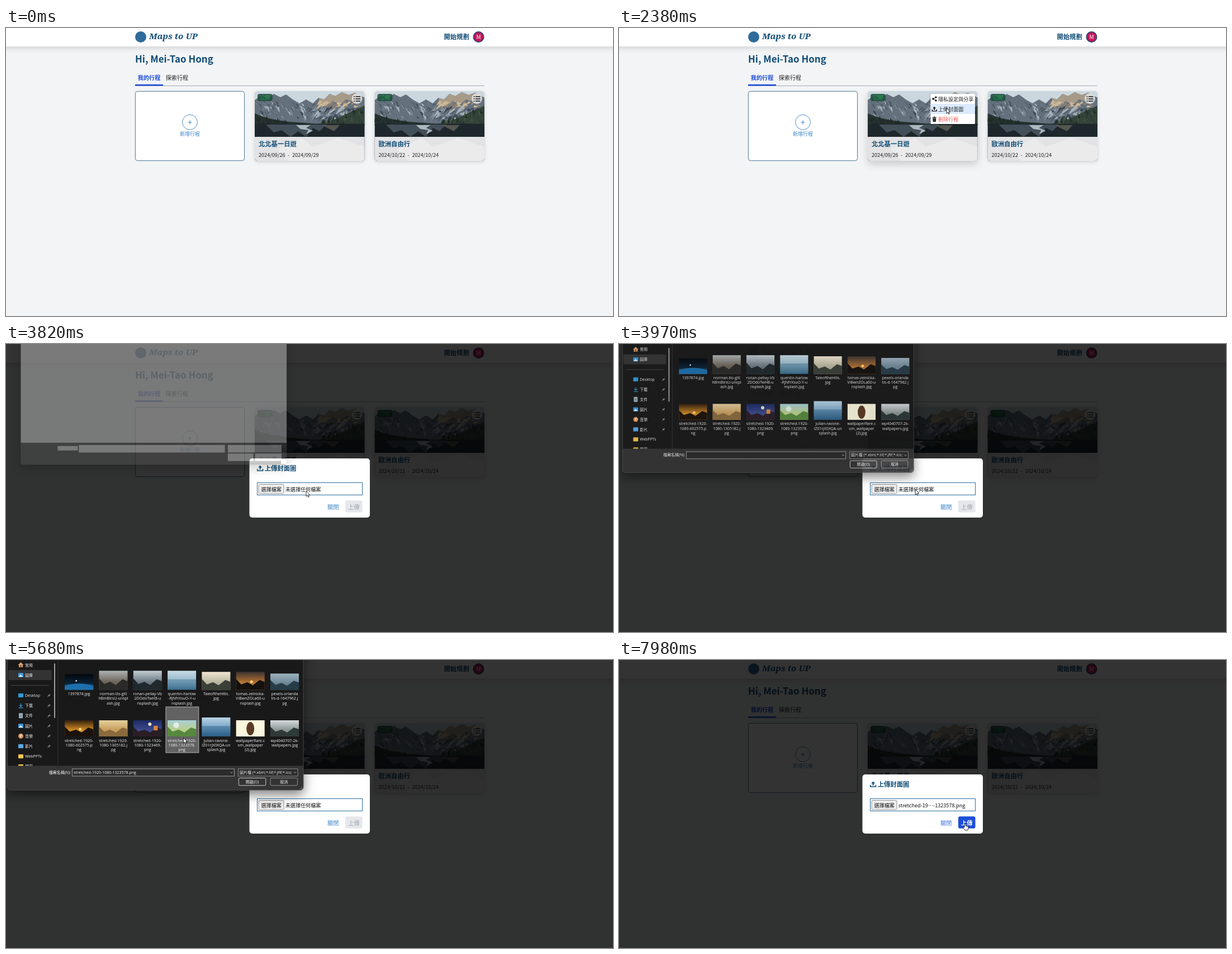
Animation of 1086x516 px, one loop 8 s. Source, as an HTML page:

```html
<!DOCTYPE html>
<html lang="zh-Hant">
<head>
<meta charset="utf-8">
<title>行程</title>
<style>
html,body{margin:0;width:100%;height:100%;overflow:hidden;background:#f3f4f6}
svg{display:block;width:1086px;height:516px}
text{font-family:"Noto Sans CJK TC","Noto Sans CJK JP","Noto Sans CJK",sans-serif;white-space:pre}
.win text{font-family:"Open Sans","Noto Sans","Noto Sans CJK TC","Noto Sans CJK JP",sans-serif}
.logo{font-family:"Noto Serif",serif!important;font-style:italic}
.bar{filter:drop-shadow(0 3px 5px rgba(0,0,0,.14))}
.card{filter:drop-shadow(0 2px 3px rgba(0,0,0,.15))}
.card.over{filter:drop-shadow(0 6px 7px rgba(0,0,0,.17))}
.pop{filter:drop-shadow(0 1px 2px rgba(0,0,0,.2))}
.frame{filter:drop-shadow(0 8px 10px rgba(0,0,0,.5))}
</style>
</head>
<body>
<svg id="stage" viewBox="0 0 1086 516"></svg>
<script>
const NAVY = '#0f4c75', BLUE = '#1d4ed8', SKY = '#3b82c4';

const attrs = o => Object.entries(o).map(([k, v]) => `${k}="${v}"`).join(' ');
const rect = (x, y, w, h, fill, o = {}) =>
  `<rect x="${x}" y="${y}" width="${w}" height="${h}" fill="${fill}" ${attrs(o)}/>`;
const text = (x, y, size, str, fill, o = {}) =>
  `<text x="${x}" y="${y}" font-size="${size}" fill="${fill}" ${attrs(o)}>${str}</text>`;
const poly = (pts, fill, o = {}) => `<polygon points="${pts}" fill="${fill}" ${attrs(o)}/>`;
const disc = (x, y, r, fill, o = {}) => `<circle cx="${x}" cy="${y}" r="${r}" fill="${fill}" ${attrs(o)}/>`;
const line = (d, stroke, w = 1) => `<path d="${d}" fill="none" stroke="${stroke}" stroke-width="${w}"/>`;
const at = (x, y, body, o = {}) => `<g transform="translate(${x} ${y})" ${attrs(o)}>${body}</g>`;
const BOLD = { 'font-weight': 700 }, MID = { 'text-anchor': 'middle' };

let seed = 7;
const rnd = () => (seed = seed * 16807 % 2147483647) / 2147483647;

// Icons
const upload = s => `<g transform="scale(${s})">` +
  line('M.8 6V9.2H10.2V6', 'currentColor', 1.6) +
  poly('5.5,0 9,3.6 6.5,3.6 6.5,7 4.5,7 4.5,3.6 2,3.6', 'currentColor') + '</g>';
const share = line('M7 1.5L2 4.5L7 7.5', '#111') +
  disc(7, 1.6, 1.7, '#111') + disc(2, 4.5, 1.7, '#111') + disc(7, 7.4, 1.7, '#111');
const trash = rect(.8, .8, 7, 1.2, '#111') + rect(3, 0, 2.6, 1, '#111') +
  '<path d="M1.3 2.7H7.3L6.9 9H1.7Z" fill="#111"/>' + line('M3.3 4V8M5.3 4V8', '#888', .5);
const list = [0, 4, 8].map(y => disc(1, y, 1, '#222') + rect(3.4, y - .8, 8.6, 1.6, '#222')).join('');

// Mountain lake: rock shards, pine slopes, dark mirror water
function photo() {
  let s = rect(0, 0, 197, 125, '#cbd7df') +
    poly('0,16 12,8 24,14 34,5 46,11 56,6 68,15 80,22 92,15 104,22 114,12 124,15 134,5 144,9 156,2 168,7 180,3 197,12 197,62 0,62', '#64717d') +
    poly('114,12 124,15 134,5 144,9 156,2 168,7 180,3 190,9 176,19 164,15 152,25 142,19 130,29 118,22', '#a69a88');
  for (let i = 0; i < 170; i++) {
    const x = rnd() * 185, y = 16 + rnd() * 32, w = 2 + rnd() * 5, h = 4 + rnd() * 9;
    const lean = x < 95 ? .6 : -.6;
    const fill = x > 115 && y < 26 ? ['#cbb797', '#857e76'][i % 2] : ['#3d4955', '#a7b2bb', '#4f5c68', '#7f8c97'][i % 4];
    s += poly(`${x},${y} ${x + w},${y + 3} ${x + lean * h},${y + h}`, fill);
  }
  s += poly('197,26 184,32 170,38 152,47 134,54 112,59 197,62', '#34443a') +
    poly('0,40 10,44 22,48 40,52 62,55 90,57 120,60 0,62', '#26322f');
  for (let i = 0; i < 70; i++) {
    const right = i % 3, x = right ? 120 + rnd() * 76 : rnd() * 60;
    const y = right ? 60 - (x - 112) * .36 * rnd() : 60 - (62 - x) * .25 * rnd();
    s += poly(`${x},${y - 7} ${x + 1.8},${y} ${x - 1.8},${y}`, ['#1f2b28', '#47573f', '#2b3a33'][i % 3 ? (i >> 1) % 3 : 0]);
  }
  s += rect(0, 58.5, 197, 67, '#1e272c') +
    poly('20,60 128,60 116,72 104,66 92,82 78,72 64,82 48,70 34,74', '#434f59') +
    poly('74,61 100,61 92,66 104,71 92,77 96,70 82,68', '#adb8bf') +
    poly('120,61 152,61 142,72 132,67', '#555650') +
    poly('40,104 84,84 104,100 150,84 197,100 197,125 60,125', '#a5adb1');
  return s;
}

const card = (id, x, title, from, to) => at(x, 113,
  rect(0, 0, 196.5, 125, '#e8e8e9', { rx: 5, class: 'card', id }) +
  '<g clip-path="url(#round)"><use href="#photo"/>' + rect(0, 82, 197, 43, '#f0f0f1', { opacity: .94 }) + '</g>' +
  rect(5, 5, 27, 13, '#1c4a39', { rx: 4, opacity: .85 }) + text(9.5, 15, 9, '公開', '#1a9a4a') +
  disc(183, 13.5, 9.5, '#e4e4e4', { opacity: .85 }) + at(177, 10, list) +
  text(7, 99, 11.3, title, NAVY, BOLD) +
  text(7, 117.5, 9.1, from, '#222') + text(59, 117.5, 9.1, '-', '#222') + text(67, 117.5, 9.1, to, '#222'));

const page =
  rect(0, 0, 1086, 516, '#f3f4f6') +
  rect(-20, -10, 1126, 43, '#fff', { class: 'bar' }) +
  disc(241, 16, 10, '#2f6c9b') +
  text(256, 20, 15.2, 'Maps to UP', NAVY, { ...BOLD, class: 'logo' }) +
  text(783.5, 20.3, 11.3, '開始規劃', NAVY, BOLD) +
  disc(845.5, 16, 9.3, '#c2185b', { stroke: NAVY, 'stroke-width': 1.4 }) +
  text(845.5, 19.6, 10, 'M', '#fff', { ...MID, 'font-weight': 500 }) +
  text(231, 62, 16.9, 'Hi, Mei-Tao Hong', NAVY, BOLD) +
  rect(231, 103, 625, 1, '#a3a9b3') + rect(231, 101, 50, 2.6, BLUE) +
  text(235.8, 93.3, 10.15, '我的行程', BLUE, BOLD) + text(285.7, 93.3, 10.15, '探索行程', '#222') +
  rect(231.4, 113.4, 195.2, 124.3, '#fff', { rx: 4, stroke: NAVY, 'stroke-width': .75 }) +
  disc(329, 168.8, 13.4, 'none', { stroke: SKY, 'stroke-width': .9 }) + line('M325.5 169H332.5M329 165.5V172.5', SKY) +
  text(329, 193, 9, '新增行程', SKY, MID) +
  card('card1', 445, '北北基一日遊', '2024/09/26', '2024/09/29') +
  card('card2', 659.5, '歐洲自由行', '2024/10/22', '2024/10/24');

const menu = rect(557.5, 118, 79.5, 54, '#fff', { rx: 1.5, class: 'pop' }) +
  rect(557.5, 118, 79.5, 18, '#dbeafe', { id: 'row' }) +
  at(560, 122.5, share) + at(559.5, 141, upload(.85), { color: '#111' }) + at(560, 159, trash) +
  text(571, 130.5, 9.05, '隱私設定與分享', '#222') + text(571, 148.7, 9.05, '上傳封面圖', '#222') +
  text(571, 166.8, 9.05, '刪除行程', '#ef5350');

const modal = rect(0, 0, 1086, 516, '#000', { opacity: .8 }) +
  rect(435.5, 205, 215.5, 106, '#fff', { rx: 5 }) +
  at(449, 217.5, upload(1.03), { color: NAVY }) +
  text(462.7, 227, 11.35, '上傳封面圖', NAVY, BOLD) +
  rect(449.5, 248.5, 188, 22, '#fff', { stroke: '#2b6f9e' }) +
  rect(452, 251.5, 45, 16.5, '#efefef', { rx: 1.5, stroke: '#767676', 'stroke-width': .8 }) +
  text(456.5, 263.5, 9.1, '選擇檔案', '#111') + text(499.7, 263.5, 9.1, '', '#111', { id: 'picked' }) +
  text(575, 295.6, 10.2, '關閉', SKY, { id: 'close' }) +
  rect(607, 280.3, 30.5, 21.5, '#e5e7eb', { rx: 3, id: 'send' }) +
  text(612, 295.6, 10.2, '上傳', '#9ca3af', { id: 'sendText', 'font-weight': 500 });

// label, height, sky, middle, ground
const files = [
  ['1397874.jpg', 28, '#04070d', '#0b2236', '#3f9bd8'],
  ['norman-tlo-gXl|hBmBirsU-unspl|ash.jpg', 34, '#aeb4b5', '#6b6258', '#2a2b29'],
  ['ronan-pellay-Vb|2DOdoTwH8-u|nsplash.jpg', 34, '#c2ccd2', '#6a7781', '#20292d'],
  ['quentin-harlow|-RjNfrXsuO-Y-u|nsplash.jpg', 34, '#c8dbe6', '#8fb4c9', '#3d6f8f'],
  ['TaleoftheHills.|jpg', 32, '#f1e6d2', '#b7b59d', '#3a4038'],
  ['tomas-zelnicka-|ViBwnZOLa60-u|nsplash.jpg', 32, '#3b3330', '#b87333', '#14110f'],
  ['pexels-orlanda|tis-d-1647962.j|pg', 29, '#9db2bf', '#6d8796', '#263c48'],
  ['stretched-1920-|1080-602575.p|ng', 29, '#33200f', '#d18a24', '#1b120b'],
  ['stretched-1920-|1080-1305182.j|pg', 29, '#e5cf9c', '#c79d5c', '#8a6a3e'],
  ['stretched-1920-|1080-1323469.|png', 29, '#1c2a63', '#3c4a8c', '#2b1d26'],
  ['stretched-1920-|1080-1323578.|png', 29, '#a9d0d8', '#b9cf8a', '#57883f'],
  ['julian-ravone-|IZ01rjX0XQA-un|splash.jpg', 34, '#b9d3e6', '#6f9fc0', '#2c5d85'],
  ['wallpaperflare.c|om_wallpaper|(2).jpg', 29, '#fbf7df', '#fbf7df', '#fbf7df'],
  ['wp4040707-2k-|wallpapers.jpg', 29, '#d5dadb', '#8b9694', '#2e3a38']
];
const flat = new Set([0, 3, 11, 12]);

function file([label, h, sky, mid, ground], i) {
  const cx = 130.7 + 61.3 * (i % 7), row = i > 6 ? 1 : 0, x = cx - 25.5, base = 53.3 + 83.7 * row, y = base - h;
  let s = `<linearGradient id="g${i}" x2="0" y2="1"><stop stop-color="${sky}"/><stop offset=".6" stop-color="${mid}"/>` +
    `<stop offset="1" stop-color="${flat.has(i) ? ground : mid}"/></linearGradient>` + rect(x, y, 51, h, `url(#g${i})`);
  if (i === 0) s += `<path d="M${x} ${base}V${base - 7}Q${cx} ${base - 15} ${x + 51} ${base - 7}V${base}Z" fill="#1d70ad"/>` + disc(cx - 5, y + 12, 1.3, '#fff');
  else if (i === 12) s += `<ellipse cx="${cx}" cy="${y + 15}" rx="7" ry="12" fill="#5a3a24"/>`;
  else if (i === 3 || i === 11) s += rect(x, base - h * .55, 51, h * .55, ground, { opacity: .45 });
  else {
    const k = a => base - h * a;
    s += poly(`${x},${base} ${x},${k(.6)} ${x + 9},${k(.3)} ${x + 20},${k(.42)} ${x + 30},${k(.25)} ${x + 42},${k(.55)} ${x + 51},${k(.45)} ${x + 51},${base}`, ground);
    if (i === 7 || i === 5) s += disc(cx + 2, k(.45), 2.5, '#ffd777');
    if (i === 9) s += disc(cx + 4, y + 7, 3, '#e9e3c0') + rect(cx + 11, y + 10, 7, 8, '#d9893d');
    if (i === 10) s += disc(cx - 10, y + 9, 5, '#eef6f3', { opacity: .8 });
  }
  return s + label.split('|').map((l, n) => text(cx, base + 9.6 + 8.4 * n, 7, l, '#f2f2f2', MID)).join('');
}

const pin = line('M0 5L2 3M1 1.7L3.4 4.1M2 2.5L3.6 .6L4.6 1.6L2.9 3.2', '#bbb', .9);
const places = [
  ['常用', 9, '#d98a4e'], ['圖庫', 27, '#3a9be8'], ['Desktop', 63.4, '#2f9ad6', 1], ['下載', 81.6, '#35a0e0', 1],
  ['文件', 99.8, '#9fb4c4', 1], ['圖片', 118, '#3a9be8', 1], ['音樂', 136.2, '#e0975d', 1], ['影片', 154.4, '#5aa9e6', 1],
  ['WebPPTs', 172.6, '#f3c64b'], ['檔案', 190.8, '#f3c64b']
];
const glyph = {
  '常用': y => poly(`26.5,${y - 5} 31.5,${y} 30,${y} 30,${y + 4} 23,${y + 4} 23,${y} 21.5,${y}`, '#e0a070') + rect(25.5, y, 2, 4, '#7c4a2a'),
  '下載': y => line(`M26.5 ${y - 4}V${y + 2}M23.5 ${y - 1}L26.5 ${y + 2}L29.5 ${y - 1}M22.5 ${y + 4}H30.5`, '#35a0e0', 1.1),
  '音樂': y => disc(26.5, y, 4.5, '#e0975d') + line(`M26 ${y + 2}V${y - 2}L28.5 ${y - 1}`, '#fff'),
  '文件': y => rect(23, y - 4.5, 7, 9, '#9fb4c4', { rx: 1 }) + line(`M24.5 ${y - 1}H28.5M24.5 ${y + 1}H28.5`, '#47606f', .8)
};
const place = ([name, y, fill, pinned]) =>
  (glyph[name] ? glyph[name](y) : rect(22, y - 3.7, 9, 7.4, fill, { rx: 1 }) +
    (fill === '#3a9be8' ? poly(`22.5,${y + 3} 26,${y - 1} 30.5,${y + 3}`, '#e6f3ff') : '')) +
  text(34, y + 2.6, 7, name, '#f2f2f2') + (pinned ? at(74.5, y - 2.5, pin) : '');

const box = (x, y, w, h, stroke, rx = 0, fill = '#2b2b2b') =>
  rect(x, y, w, h, fill, { stroke, rx, 'stroke-width': .9 });
const chevron = x => line(`M${x} 200.5L${x + 2} 202.5L${x + 4} 200.5`, '#ddd', .8);

const picker = rect(2.5, -100, 529.5, 333, '#343434', { rx: 5, class: 'frame', stroke: '#555', 'stroke-width': .8 }) +
  '<g id="content">' + rect(3, -99, 528.5, 288.5, '#191919') +
  rect(92.5, -99, 1, 288.5, '#333') + rect(4, 18, 78, 18, '#333', { rx: 2 }) +
  rect(9, 45, 68, 1, '#444') + rect(86, 6, 2, 98, '#a0a0a0', { rx: 1 }) +
  `<g clip-path="url(#pane)">${places.map(place).join('')}</g>` +
  rect(286, 84, 58.8, 82, '#4d4d4d', { id: 'tile' }) + files.map(file).join('') +
  text(116, 203.7, 7, '檔案名稱(N):', '#f2f2f2', { 'text-anchor': 'end' }) +
  box(118.5, 195, 290, 13, '#aaa') + chevron(401.5) + text(121, 203.9, 7, '', '#f2f2f2', { id: 'field' }) +
  box(415.5, 195, 106.5, 13, '#999') + chevron(515) +
  `<g clip-path="url(#types)">${text(418, 203.7, 7, '圖片檔 (*.xbm;*.tif;*.jfif;*.ico;*.tiff', '#f2f2f2')}</g>` +
  box(416.3, 211.5, 48.5, 13.3, '#e0e0e0', 2, '#333') + text(440.5, 220.6, 7, '開啟(O)', '#f2f2f2', MID) +
  box(473, 211.5, 48.5, 13.3, '#999', 2, '#333') + text(497.3, 220.6, 7, '取消', '#f2f2f2', MID) +
  disc(529.5, 230.5, .7, '#aaa') + disc(527, 230.5, .7, '#aaa') + disc(529.5, 228, .7, '#aaa') + '</g>' +
  '<g id="blank">' + rect(2.5, -100, 529.5, 333, '#5c5c5c', { rx: 5 }) +
  [[2.5, -100, 529.5, 289.5], [76, 196, 40, 9], [118, 194, 291, 15], [415, 194, 107, 15],
   [415, 211, 51, 15], [469, 211, 53, 15], [521, 222, 11, 10]].map(b => rect(...b, '#fff')).join('') + '</g>';

const clip = (id, body) => `<clipPath id="${id}">${body}</clipPath>`;
const stage = document.getElementById('stage');
stage.innerHTML = '<defs>' + clip('round', rect(0, 0, 196.5, 125, '#000', { rx: 5 })) +
  clip('pane', rect(3, -99, 89, 288.5, '#000')) + clip('types', rect(416, 195, 96, 13, '#000')) +
  `<g id="photo">${photo()}</g></defs>` + page +
  `<g id="menu">${menu}</g><g id="modal">${modal}</g><g id="picker" class="win">${picker}</g>` +
  '<g id="mouse" stroke-linejoin="round" fill="#fff" stroke="#000" stroke-width=".8">' +
  '<path id="arrow" d="M0 0V9.6L2.2 7.6L3.8 11L5.3 10.4L3.8 7H6.8Z"/>' +
  '<path id="hand" d="M1 1Q2 -.6 3 1V5L7 6Q8.4 6.6 8 9L7 13H2L-1.6 8.6Q-1.4 6.8 1 8Z"/></g>';

const $ = id => document.getElementById(id);
const show = (id, on) => $(id).style.display = on ? '' : 'none';
const set = (id, k, v) => $(id).setAttribute(k, v);
const clamp = v => Math.max(0, Math.min(1, v));

// Pointer path: time, x, y
const path = [
  [90, 1022, 330], [450, 840, 215], [850, 645, 140], [1110, 629, 124], [1320, 629, 124], [1970, 586, 143],
  [2440, 586, 143.5], [2480, 586, 143.5], [3060, 530, 257], [3310, 530, 257], [3460, 541, 262], [3660, 537, 263.5],
  [3900, 537, 263.5], [4600, 300, 152], [4750, 287, 141.5], [5180, 316, 138], [5580, 316, 138], [5730, 318, 140],
  [6250, 318, 140], [6620, 509, 221], [6900, 446, 217], [7120, 446, 217], [7870, 581, 291], [7980, 617, 292]
];
function pointer(t) {
  const n = path.findIndex(p => p[0] > t);
  if (n < 1) return path[n < 0 ? path.length - 1 : 0].slice(1);
  const [a, x, y] = path[n - 1], [b, u, v] = path[n];
  let p = (t - a) / (b - a);
  p = p * p * (3 - 2 * p);
  return [x + (u - x) * p, y + (v - y) * p];
}

function draw(t) {
  const [x, y] = pointer(t);
  const inside = (l, top, r, b) => t >= 90 && x >= l && x < r && y >= top && y < b;
  const menuOn = t >= 1320 && t < 2440, modalOn = t >= 2440, chosen = t >= 5200, done = t >= 7150;

  const over1 = !modalOn && inside(445, 113, 641.5, 238), over2 = !modalOn && inside(659.5, 113, 856, 238);
  $('card1').classList.toggle('over', over1);
  $('card2').classList.toggle('over', over2);
  show('menu', menuOn);
  set('row', 'y', 118 + 18 * clamp(Math.floor((y - 118) / 18)));

  show('modal', modalOn);
  $('picked').textContent = done ? 'stretched-19…-1323578.png' : '未選擇任何檔案';
  const onClose = done && inside(572, 282, 599, 302), onSend = done && inside(607, 280, 638, 302);
  set('close', 'fill', onClose || onSend ? '#3f72dc' : SKY);
  set('send', 'fill', onSend ? BLUE : done ? NAVY : '#e5e7eb');
  set('sendText', 'fill', done ? '#fff' : '#9ca3af');
  set('sendText', 'font-weight', done ? 700 : 500);

  const open = 1 - (1 - clamp((t - 3870) / 220)) ** 3, shut = clamp((t - 7090) / 140);
  const scale = .898 + .102 * open - .1 * shut;
  show('picker', t >= 3820 && shut < 1);
  set('picker', 'opacity', (.35 + .65 * open) * (1 - shut));
  set('picker', 'transform', `translate(238 66) scale(${scale}) translate(-238 -66)`);
  show('blank', t < 3960);
  show('content', t >= 3960);
  const onTile = inside(286, 84, 345, 166);
  show('tile', onTile || chosen);
  set('tile', 'fill', chosen && onTile ? '#626262' : '#4d4d4d');
  set('tile', 'stroke', chosen ? '#b5b5b5' : 'none');
  $('field').textContent = chosen ? 'stretched-1920-1080-1323578.png' : '';

  const hand = onClose || onSend || over2 || over1 && !menuOn;
  show('mouse', t >= 90);
  show('hand', hand);
  show('arrow', !hand);
  set('mouse', 'transform', `translate(${x} ${y})`);
}

const start = performance.now();
function tick() {
  draw((performance.now() - start) % 8000);
  requestAnimationFrame(tick);
}
tick();
</script>
</body>
</html>
```
